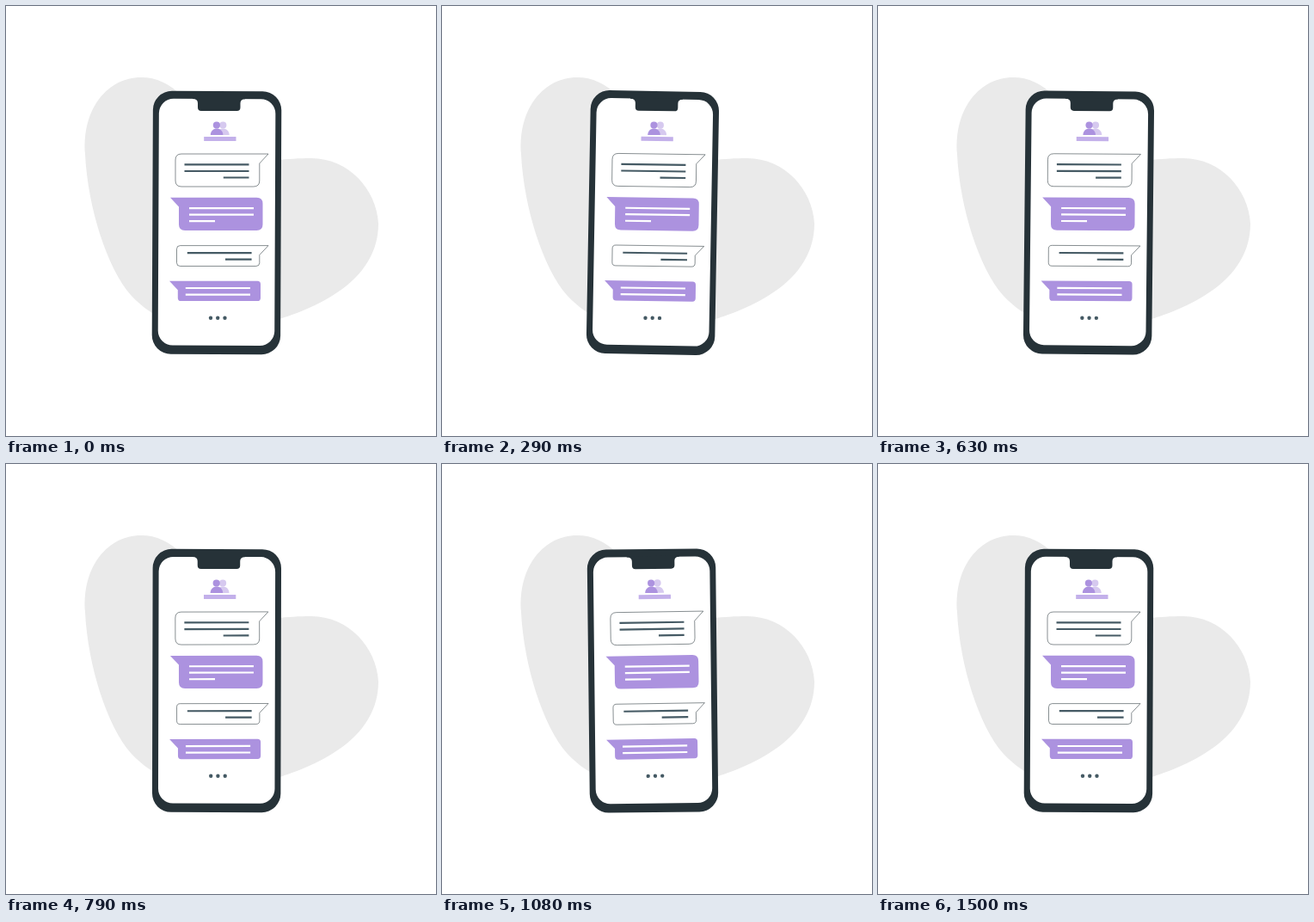
These frames come from a looping animation (500 px wide and 500 px high, 1540 ms). An HTML page:

```html
<!DOCTYPE html>
<html lang="en">
<head>
<meta charset="utf-8">
<title>Phone chat</title>
<style>
  html, body { margin: 0; width: 100%; height: 100%; overflow: hidden; background: #fff; }
  svg { display: block; width: 100%; height: 100%; }
  .dark { fill: #263238; }
  .purple { fill: #ac92df; }
  .outline { fill: #fff; stroke: #263238; stroke-width: .55; }
  .ink, .chalk { fill: none; stroke: #455a64; stroke-width: 2.2; }
  .chalk { stroke: #fff; }
</style>
</head>
<body>
<svg viewBox="0 0 500 500">
  <path fill="#eaeaea" d="M157 83C118 83 88 120 92 172C95 235 118 305 145 336C155 347 165 354 175 360L318 364C372 347 433 315 433 253C431 213 398 177 355 177C340 177 328 178 315 179L205 105C190 90 175 83 157 83Z"/>
  <g id="phone">
    <g transform="rotate(.25 245 252)">
      <rect class="dark" x="170.3" y="99" width="149.4" height="306" rx="22"/>
      <rect fill="#fff" x="177.3" y="108" width="135.5" height="286.7" rx="17"/>
    </g>
    <path class="dark" d="M217 107H278V108.3Q272.5 108.3 272.5 113V118Q272.5 122 268.5 122H227Q223 122 223 118V113Q223 108 217 108Z"/>

    <g fill="#d6c9ef">
      <circle cx="252.3" cy="138.5" r="4.1"/>
      <path d="M245 150C245 140 259.5 140 259.7 150Z"/>
    </g>
    <g class="purple">
      <circle cx="244.9" cy="138.5" r="4.1"/>
      <path d="M237.8 150C238 140 252.2 140 252.4 150Z"/>
    </g>
    <rect fill="#c3b0ea" x="230.2" y="152" width="37.3" height="5"/>

    <path class="outline" d="M204 172H305L294.8 183V203Q294.8 210 287.8 210H204Q197 210 197 203V179Q197 172 204 172Z"/>
    <path class="ink" d="M207.5 184.3h75M207.5 192h75M252.8 199.5h29.7"/>

    <path class="purple" d="M191 222.8H291.5Q298.5 222.8 298.5 229.8V254Q298.5 261 291.5 261H208Q201 261 201 254V233.5Z"/>
    <path class="chalk" d="M213 235.2h75M213 242.6h75M213 250.2h30"/>

    <path class="outline" d="M202.5 278.6H305L294.8 289.5V298.5Q294.8 302.5 290.8 302.5H202.5Q198.5 302.5 198.5 298.5V282.6Q198.5 278.6 202.5 278.6Z"/>
    <path class="ink" d="M210.8 287.2h74.8M255 294.7h30.6"/>

    <path class="purple" d="M190 319.8H292.3Q296 319.8 296 323.5V339.4Q296 343.1 292.3 343.1H203.5Q199.8 343.1 199.8 339.4V330.3Z"/>
    <path class="chalk" d="M208.8 328h75.2M208.8 335.6h75.2"/>

    <g fill="#455a64">
      <circle cx="238" cy="362.8" r="2.2"/>
      <circle cx="246.2" cy="362.8" r="2.2"/>
      <circle cx="254.5" cy="362.8" r="2.2"/>
    </g>
  </g>
</svg>
<script>
  const LOOP = 1540, SWING = 1500, STEP = 1000 / 24;
  const phone = document.getElementById('phone');
  const start = performance.now();

  // Triangle wave: 0 → 1° → -1° → 0 over one swing
  function angleAt(ms) {
    const p = ms / SWING;
    return p < .25 ? 4 * p : p < .75 ? 2 - 4 * p : 4 * p - 4;
  }

  function draw() {
    const t = (performance.now() - start) % LOOP;
    const step = Math.min(36, Math.floor((t + 5) / STEP));
    phone.setAttribute('transform', `rotate(${angleAt(step * STEP)} 245 252)`);
    requestAnimationFrame(draw);
  }
  draw();
</script>
</body>
</html>
```
